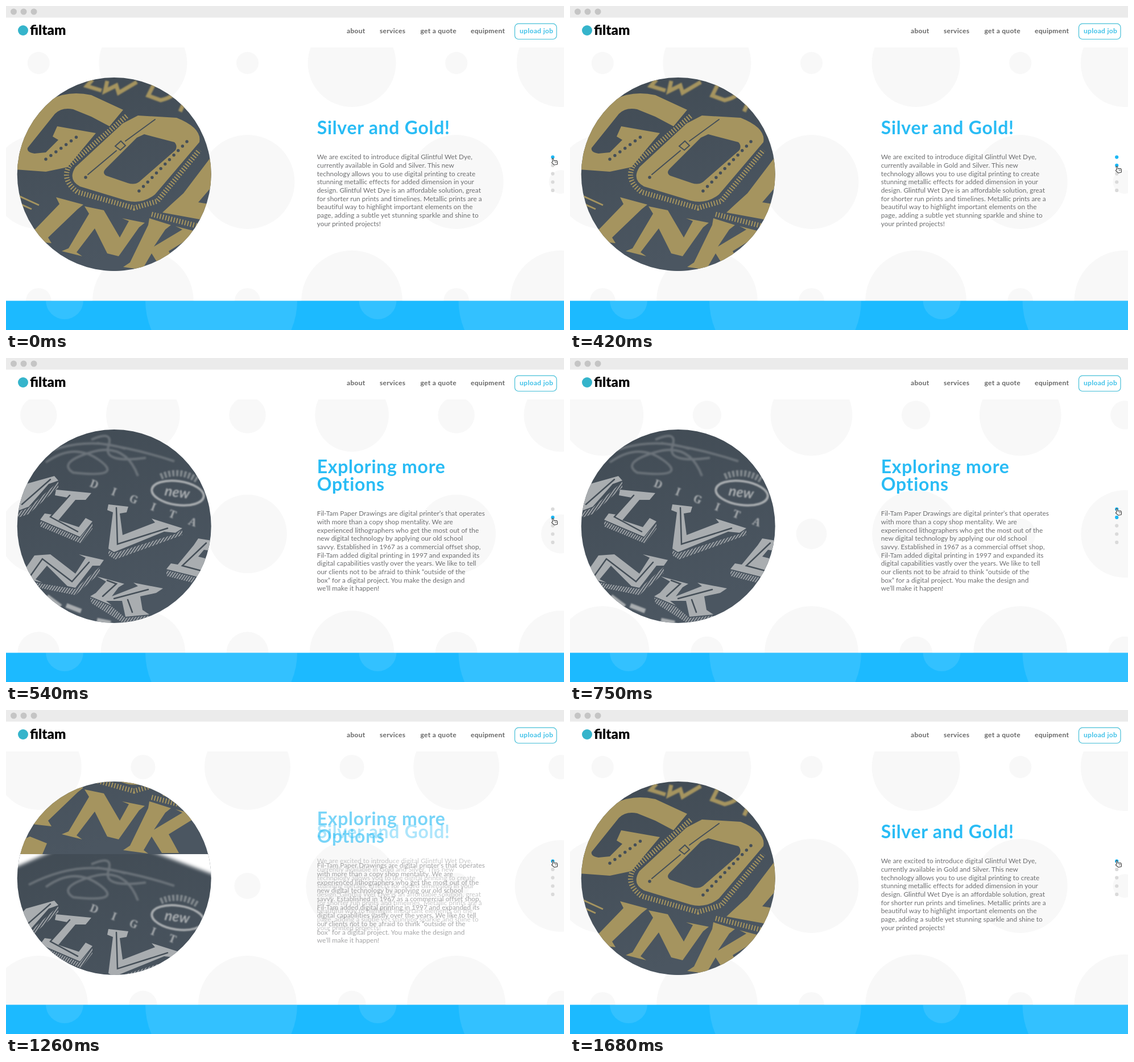
These frames come from a looping animation (981 px wide and 571 px high, 1710 ms). An HTML page:

```html
<!DOCTYPE html>
<html lang="en">
<meta charset="utf-8">
<title>Print shop slider</title>
<style>
  html, body { margin: 0; width: 100%; height: 100%; overflow: hidden; background: #fff }
  svg { display: block; width: 981px; height: 571px; font-family: Lato, sans-serif }
  .nav { font-size: 12px; font-weight: 700; letter-spacing: .3px; fill: #666 }
  .title { font-size: 32px; font-weight: 700; letter-spacing: .7px; fill: #29bcf5 }
  .body { font-size: 11.8px; letter-spacing: .05px; fill: #6d6e70 }
  .gold { fill: #a5945f }
  .goldline { fill: none; stroke: #a5945f }
  .darkline { fill: none; stroke: #454f58; stroke-linecap: round }
  .silver { fill: #a9adb0 }
  .silverline { fill: none; stroke: #a9adb0 }
  .soft { filter: blur(1.2px) }
</style>
<svg viewBox="0 0 981 571">
  <defs>
    <clipPath id="lens"><circle cx="190.2" cy="296.5" r="170.5"/></clipPath>
    <clipPath id="panel"><path d="M0 73H981V520H0Z"/></clipPath>
    <clipPath id="footer"><path d="M0 519.6H981V571H0Z"/></clipPath>
    <linearGradient id="slate" x2=".3" y2="1">
      <stop stop-color="#414b54"/><stop offset="1" stop-color="#4b5661"/>
    </linearGradient>
    <pattern id="hatch" width="4" height="4" patternUnits="userSpaceOnUse" patternTransform="rotate(-55)">
      <path d="M0 1H4" stroke="#a9adb0" stroke-width="1.7"/>
    </pattern>
  </defs>

  <g id="bubbles" fill="#f8f8f8" clip-path="url(#panel)"></g>

  <path fill="#ebebeb" d="M0 0H981V20.5H0Z"/>
  <g fill="#c5c5c5"><circle cx="13.5" cy="10" r="5.5"/><circle cx="31" cy="10" r="5.5"/><circle cx="49" cy="10" r="5.5"/></g>
  <circle cx="30" cy="43" r="9" fill="#35b4cb"/>
  <text x="42" y="51" font-size="24" font-weight="900">filtam</text>
  <g class="nav">
    <text x="599" y="48">about</text>
    <text x="657" y="48">services</text>
    <text x="728.5" y="48">get a quote</text>
    <text x="817" y="48">equipment</text>
    <text x="903" y="48" fill="#3fc1e8">upload job</text>
  </g>
  <rect x="894.5" y="31.2" width="73.5" height="27.3" rx="6.5" fill="none" stroke="#45bfd8" stroke-width="1.2"/>

  <path fill="#1cbaff" d="M0 519.6H981V571H0Z"/>
  <g fill="#fff" fill-opacity=".1" clip-path="url(#footer)">
    <circle cx="103" cy="519" r="33"/><circle cx="378.5" cy="519" r="133.5"/>
    <circle cx="653.5" cy="519" r="33"/><circle cx="929" cy="519" r="133.5"/>
  </g>

  <g clip-path="url(#lens)">
    <g id="reel">
      <g transform="translate(0 341)">
        <path fill="url(#slate)" d="M19 125H362V467H19Z"/>
        <path fill="#fff" style="filter:blur(3px)" d="M10 120H84L10 152ZM252 120H370V164Z"/>
        <g class="silverline" style="filter:blur(1.5px)" stroke-width="4" opacity=".4">
          <path d="M70 184Q120 148 164 180T118 202Q90 184 150 166T232 208"/>
          <path d="M150 144Q190 126 180 156T246 176M40 180Q130 134 210 160M160 150Q230 160 296 182"/>
        </g>
        <g class="silver soft" font-weight="700">
          <text transform="translate(146 226) rotate(21)" font-family="Noto Serif, serif" font-size="19" letter-spacing="26">DIGITA</text>
          <text transform="translate(278 242) rotate(8)" font-size="25" font-style="italic">new</text>
        </g>
        <g class="silverline soft">
          <ellipse cx="302" cy="238" rx="46" ry="21" stroke-width="4" transform="rotate(8 302 238)"/>
          <path stroke-width="11" stroke-dasharray="4 3" opacity=".6" d="M272 209Q306 194 338 216"/>
        </g>
        <g class="silver">
          <path d="M35 222L85 208L92 216L75 222L40 262L19 270V240Z"/>
          <path d="M88 232L150 238L140 250L122 250L92 286L128 298L140 282L152 288L130 315L60 285L68 274L82 276L108 246L86 242Z"/>
          <path d="M180 258L215 262L212 272L200 274L205 312L262 290L256 283L310 300L298 308L278 306L190 342L180 336L188 272L178 268Z"/>
          <path d="M338 318L362 322V340L348 338L338 350L362 356V392L282 372L290 362L302 364L330 330Z"/>
          <path d="M50 348L78 346L122 380L140 352L128 346L172 356L165 366L152 366L122 405L108 402L72 366L52 390L64 396L24 386Z"/>
          <path d="M160 385L208 398L198 404L186 420L232 402L224 396L276 406L264 414L236 420L240 444L252 452L210 456L204 428L176 428L186 436L148 420L158 414L176 394Z"/>
        </g>
        <path class="darkline" stroke-width="2.5" d="M28 258L78 214M112 242L78 280L126 306M194 264L196 328L284 300M40 388L64 354L116 394L146 360M178 392L194 398L170 420M190 424L250 408M214 426L222 448M352 326L310 366L362 380"/>
        <path fill="url(#hatch)" d="M60 287L130 317L152 290V301L132 327L60 297ZM180 338L190 344L298 310L310 302V312L192 355L180 348ZM30 390L64 398L122 407L165 368V379L122 418L34 400ZM148 422L186 438L210 458L252 454V463L206 467L150 432ZM282 374L362 394V405L282 384ZM40 264L92 218V228L40 275L19 282V272Z"/>
        <path class="silverline soft" stroke-width="8" d="M72 420L96 438M106 436L132 446M160 462L184 467"/>
      </g>

      <path fill="url(#slate)" d="M19 125H362V467H19Z"/>
      <g class="goldline soft" stroke-width="7">
        <path d="M152 130L142 141L168 149M178 132L174 150L194 140L198 153L230 134"/>
        <path d="M262 134L250 158L272 166Q300 160 302 140L270 130M318 160L306 186"/>
      </g>
      <g class="gold">
        <path d="M18 225L78 165Q110 148 150 157L206 183L182 212L150 195L118 182Q98 178 86 190L38 250Q36 258 50 260L70 258L92 236L82 230L90 212L158 224L108 284L70 292L15 288Z"/>
        <path fill-rule="evenodd" d="M232 193L300 197Q345 215 340 240L262 332Q240 350 212 343L130 318Q108 306 122 284L205 207ZM243 226L296 240Q302 246 298 254L234 310Q226 316 214 312L176 299Q168 294 176 286L230 232Z"/>
        <path d="M362 264L312 330L290 350L275 364L362 380V350L338 346L362 318Z"/>
        <path d="M88 337L136 350L126 358L74 408L80 418L28 412L42 403L94 349Z"/>
        <path d="M138 353L172 360L200 408L216 379L204 374L244 382L234 390L198 441L178 436L156 392L124 434L134 441L98 432L110 427L146 366Z"/>
        <path d="M252 374L290 386L280 394L260 424L310 394L298 388L344 400L328 406L286 432L304 465H274L256 436L242 460L250 466L206 460L218 452L250 386Z"/>
        <path d="M19 446L42 436L72 448L64 467H19Z"/>
      </g>
      <path class="goldline" stroke-width="9" stroke-dasharray="2 3" d="M212 194L112 280Q96 306 126 328L225 356L266 344L340 254M256 367L354 392"/>
      <path class="goldline" stroke-width="3" d="M19 333L58 351M19 346L45 358"/>
      <path class="darkline" stroke-width="2" d="M144 297L194 255M210 238L262 200M202 238L210 246L201 254L192 247Z"/>
      <path class="darkline" stroke-width="5.5" stroke-dasharray="0 11" d="M318 239L232 328M70 270L128 228M140 302H141"/>
    </g>
  </g>

  <g id="first"></g>
  <g id="second"></g>
  <g id="dots"></g>
  <g id="cursor" fill="#fff" stroke="#333" stroke-linejoin="round">
    <path d="M-3 0V-5.2Q-2-7.2-.8-5.2V-1.5L4-.6Q5.5 0 5 2L4 6H-1.5L-5 1.5Q-5-.5-3 0Z"/>
    <path fill="none" stroke-width=".8" d="M1 1V3M3 1.2V3.2"/>
  </g>
</svg>
<script>
const $ = id => document.getElementById(id);
const add = (parent, tag, attrs, text = '') => {
  const el = document.createElementNS('http://www.w3.org/2000/svg', tag);
  for (const key in attrs) el.setAttribute(key, attrs[key]);
  el.textContent = text;
  return parent.appendChild(el);
};
const lines = (parent, cls, top, step, text) => text.split('\n').forEach((line, i) =>
  add(parent, 'text', { class: cls, x: 546.7, y: top + i * step }, line));

lines($('first'), 'title', 226, 32, 'Silver and Gold!');
lines($('first'), 'body', 270.3, 14.67, `We are excited to introduce digital Glintful Wet Dye,
currently available in Gold and Silver. This new
technology allows you to use digital printing to create
stunning metallic effects for added dimension in your
design. Glintful Wet Dye is an affordable solution, great
for shorter run prints and timelines. Metallic prints are a
beautiful way to highlight important elements on the
page, adding a subtle yet stunning sparkle and shine to
your printed projects!`);
lines($('second'), 'title', 202.5, 31.7, 'Exploring more\nOptions');
lines($('second'), 'body', 278.3, 14.67, `Fil-Tam Paper Drawings are digital printer’s that operates
with more than a copy shop mentality. We are
experienced lithographers who get the most out of the
new digital technology by applying our old school
savvy. Established in 1967 as a commercial offset shop,
Fil-Tam added digital printing in 1997 and expanded its
digital capabilities vastly over the years. We like to tell
our clients not to be afraid to think “outside of the
box” for a digital project. You make the design and
we’ll make it happen!`);

const bubbles = [];
[1, 1.07, 1.145].forEach((scale, row) => {
  for (let col = 0; col < 6; col++) {
    const el = add($('bubbles'), 'circle', { cx: 57.3 + col * 183.6, cy: 100.5 + row * 209.5 });
    bubbles.push({ el, scale, big: (row + col) % 2 });
  }
});
const dots = [0, 1, 2, 3, 4].map(i => add($('dots'), 'circle', { cx: 961.2, cy: 266.3 + i * 14.65, r: 3.1 }));

const LOOP = 1710, STEP = 30, NEXT = 425, BACK = 1213;
const clamp = x => Math.min(1, Math.max(0, x));
const sine = x => (1 - Math.cos(Math.PI * clamp(x))) / 2;
// cubic-bezier(.33, 0, .4, 1)
const bezier = x => {
  let lo = 0, hi = 1;
  for (let i = 0; i < 20; i++) {
    const s = (lo + hi) / 2, u = 1 - s;
    if (.99 * s * u * u + 1.2 * s * s * u + s ** 3 < clamp(x)) lo = s; else hi = s;
  }
  return lo * lo * (3 - 2 * lo);
};
const there = (ease, t, duration) => ease((t - NEXT) / duration) - ease((t - BACK) / duration);

function draw() {
  const t = Math.floor(performance.now() % LOOP / STEP) * STEP;
  const slide = there(sine, t, 112), pulse = there(bezier, t, 460);

  $('reel').setAttribute('transform', `translate(0 ${-341 * slide})`);
  $('first').setAttribute('opacity', 1 - slide);
  $('second').setAttribute('opacity', slide);
  for (const { el, scale, big } of bubbles)
    el.setAttribute('r', scale * (19.5 + 58 * (big ? 1 - pulse : pulse)));

  const y = 271 + 17 * (sine((t + 45) / 165) - sine((t - 540) / 150));
  const active = t >= NEXT && t < BACK ? 1 : 0, hover = y > 280 ? 1 : 0;
  dots.forEach((dot, i) => dot.setAttribute('fill', i === active || i === hover ? '#1cb8f5' : '#dadada'));
  $('cursor').setAttribute('transform', `translate(964.2 ${y}) rotate(-12)`);
  requestAnimationFrame(draw);
}
draw();
</script>
</html>
```
